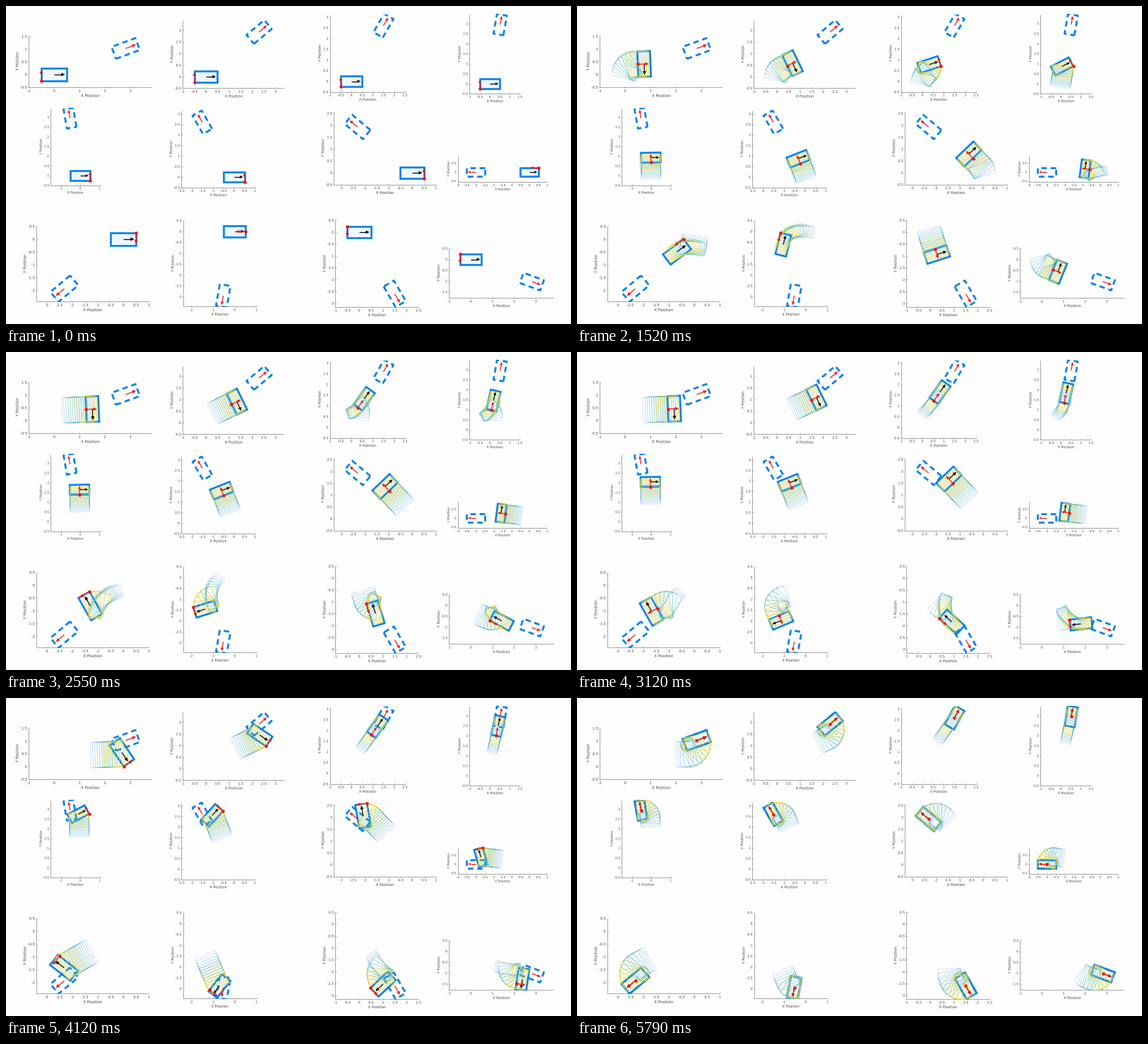
Recreate the animation shown at these times as a matplotlib script. Size 800 by 450 pixels, loop 5850 ms.

```python
import numpy as np
import matplotlib.pyplot as plt
from matplotlib.animation import FuncAnimation
from matplotlib.collections import LineCollection, PolyCollection
from matplotlib.patches import PathPatch, Polygon
from matplotlib.path import Path
from matplotlib.textpath import TextPath
from matplotlib.transforms import Bbox, TransformedBbox

W, H, DPI = 800, 450, 100
PX = 72 / DPI
STEP, FRAMES = 30, 195
LAST = 162                 # frame on which everything has come to rest
GAP, TRAIL = 4, 11         # trail spacing in frames, number of copies
SLIDE = .06                # how far the contact slides per frame
BLUE, FILL, RED, INK = "#0b82e8", "#eff6fc", "#f21414", "#404040"

BOX = np.array([(-.5, -.25), (.5, -.25), (.5, .25), (-.5, .25), (-.5, -.25)])

# face -> push angle in the block frame, depth of the face, half its length
FACES = {"b": (np.pi / 2, .25, .5), "t": (-np.pi / 2, .25, .5),
         "r": (np.pi, .5, .25), "l": (0, .5, .25)}

fig = plt.figure(figsize=(W / DPI, H / DPI), dpi=DPI, facecolor="#fdfdfd")
ax = fig.add_axes([0, 0, 1, 1])
ax.set(xlim=(0, W), ylim=(H, 0))
ax.axis("off")

panels, glyphs, rules = [], [], []


def unit(a):
    return np.array([np.cos(a), np.sin(a)])


def radius(face):
    """Turning radius when the face is pushed at its end."""
    return .2 / FACES[face][2]


def advance(pose, face, turn, dist):
    """Push a face: straight for turn 0, along an arc for turn +1 or -1."""
    x, y, a = pose
    way = a + FACES[face][0]
    if not turn:
        return x + dist * np.cos(way), y + dist * np.sin(way), a
    r = turn * radius(face)
    da = dist / r
    return (x + r * (np.sin(way + da) - np.sin(way)),
            y - r * (np.cos(way + da) - np.cos(way)), a + da)


def approach(pose, goal, face, turn):
    """Arc, straight line and left arc that bring the block to the goal."""
    r, push = radius(face), FACES[face][0]
    way, end = pose[2] + push, goal[2] + push
    d = (goal[:2] + r * unit(end + np.pi / 2)) - (pose[:2] + turn * r * unit(way + np.pi / 2))
    span, line = np.hypot(*d), np.arctan2(d[1], d[0])
    if turn < 0:
        line -= np.arcsin(2 * r / span)
        span = np.sqrt(span ** 2 - 4 * r ** 2)
    first = (turn * (line - way)) % (2 * np.pi)
    last = (end - line) % (2 * np.pi)
    return [(face, turn, r * first), (face, 0, span), (face, 1, r * last)]


def simulate(goal, lead, face, turn, arrive):
    """Pose and contact (face, offset) for every frame."""
    segs, pose = [], (0, 0, 0)
    for f, k, amount in lead:
        segs.append((f, k, np.radians(amount) * radius(f) if k else amount))
        pose = advance(pose, *segs[-1])
    segs += approach(np.array(pose), goal, face, turn)
    total = sum(s[2] for s in segs)

    poses, contacts = [], []
    for i in range(LAST + 1):
        u = i * STEP / 1000 / arrive
        left, pose = total * min(u, 1) ** 1.08, (0, 0, 0)
        for f, k, dist in segs:
            pose = advance(pose, f, k, min(left, dist))
            left -= dist
            if left < 0:
                break
        offset = k * FACES[f][2]
        if contacts and contacts[-1][0] == f:
            old = contacts[-1][1]
            offset = old + np.clip(offset - old, -SLIDE, SLIDE)
        poses.append(pose)
        contacts.append((f if u < 1 else None, offset))
    return np.array(poses), contacts


def text(s, x, y, size, ha="center", upright=False):
    path = TextPath((0, 0), s, size=size)
    v = path.vertices.copy()
    lo, hi = v[:, 0].min(), v[:, 0].max()
    v[:, 0] -= hi if ha == "right" else (lo + hi) / 2
    v[:, 1] -= .36 * size
    if upright:
        v = np.column_stack([-v[:, 1], v[:, 0]])
    glyphs.append(Path(np.column_stack([x + v[:, 0], y - v[:, 1]]), path.codes))


def ticks(lo, hi, step):
    return np.arange(np.ceil(lo / step - 1e-6) * step, hi + .01, step) + 0.0


def trail_style():
    age = np.arange(1, TRAIL + 1) / TRAIL
    stops = [0, .35, .6, .8, 1]
    rgb = [np.interp(age, stops, c) for c in
           ([.97, .88, .40, .33, .40], [.88, .82, .78, .70, .58], [.12, .22, .66, .86, .86])]
    return np.column_stack(rgb + [np.interp(age, [0, .6, 1], [.9, .75, .28])])


class Panel:
    def __init__(self, origin, scale, angle, step, lead=(), face="b", turn=1, arrive=4.8):
        self.origin, self.scale = np.array(origin), scale
        a = np.radians(angle)
        self.goal = np.array([*(3 * unit(a)), a])
        self.poses, self.contacts = simulate(self.goal, lead, face, turn, arrive)

        left, top, right, bottom = self.axes(step)
        clip = TransformedBbox(Bbox([(left - 1, bottom + 1), (right + 1, top - 1)]), ax.transData)
        self.block = Polygon(self.box(self.poses[0]), fc=FILL, ec=BLUE, lw=2.7 * PX,
                             joinstyle="miter", zorder=1)
        goal = ax.plot(*self.box(self.goal).T, color=BLUE, lw=2.8 * PX, zorder=2,
                       dashes=(2.8, 1.9), dash_capstyle="butt")[0]
        self.trail = LineCollection([], colors=trail_style(), linewidths=.85 * PX, zorder=3)
        ax.add_patch(self.block)
        ax.add_collection(self.trail, autolim=False)
        for art in (self.block, goal, self.trail):
            art.set_clip_path(None)
            art.set_clip_box(clip)

    def axes(self, step):
        """Axes that leave a fixed margin around the path of the block's centre."""
        margin = np.array([1, .5])
        lo = self.poses[:, :2].min(0) - margin
        hi = self.poses[:, :2].max(0) + margin
        flip = np.array([self.scale, -self.scale])
        (left, bottom), (right, top) = self.origin + lo * flip, self.origin + hi * flip
        rules.append([(left, top), (left, bottom), (right, bottom)])

        size = 2.3 + .088 * self.scale
        small = .92 * size
        for v in ticks(lo[0], hi[0], step):
            x = self.origin[0] + v * self.scale
            rules.append([(x, bottom), (x, bottom - 1.3)])
            text(f"{v:g}", x, bottom + .9 * size, small)
        for v in ticks(lo[1], hi[1], .5):
            y = self.origin[1] - v * self.scale
            rules.append([(left, y), (left + 1.3, y)])
            text(f"{v:g}", left - 2.5, y, small, "right")
        text("X Position", (left + right) / 2, bottom + 2.15 * size, size)
        text("Y Position", left - 3 * size, (top + bottom) / 2, size, upright=True)
        return left, top, right, bottom

    def place(self, points, pose):
        c, s = unit(pose[2])
        world = np.asarray(points) @ [(c, s), (-s, c)] + pose[:2]
        return self.origin + world * (self.scale, -self.scale)

    def box(self, pose):
        return self.place(BOX, pose)

    def arrow(self, pose, start=(0, 0), angle=0):
        d, n = unit(angle), unit(angle + np.pi / 2)
        tip = start + .42 * d
        neck = tip - .13 * d
        return (self.place([start, neck], pose),
                self.place([tip, neck + .06 * n, neck - .06 * n], pose))

    def contact(self, i):
        """Contact point and push angle; the pusher rests at the centre when done."""
        face, offset = self.contacts[i]
        if face is None:
            return np.zeros(2), None
        push, depth, _ = FACES[face]
        return offset * unit(push - np.pi / 2) - depth * unit(push), push


def add(*args, **kw):
    panels.append(Panel(*args, **kw))


# lead entries: face, turn direction, degrees turned (or distance if straight)
add((68, 97), 36, 20, 1, turn=-1)
add((283, 100), 32.8, 40, .5, turn=-1)
add((489, 106.5), 30.3, 60, .5, [("b", -1, 55), ("b", 1, 93)], "l")
add((685, 110), 28.3, 80, .5, [("b", -1, 10), ("b", 0, .55), ("b", 1, 58)], "l")
add((105, 240), 27.5, 100, 1)
add((322.7, 242), 29.8, 120, .5)
add((575, 236), 33.6, 140, .5, arrive=4.46)
add((741, 235), 25.3, 180, .5, [("r", 1, 25)])
add((166, 330), 36.3, 220, .5, [("t", -1, 10), ("t", 0, .28), ("r", 1, 75)])
add((323.7, 319), 30.8, 260, 1, [("r", 0, .25), ("r", 1, 100)], arrive=4.3)
add((500, 320), 33.6, 300, .5, [("t", 1, 18), ("t", 0, .87), ("t", 1, 70), ("r", 1, 52)])
add((658, 358.5), 30.7, 340, 1, [("t", 1, 68), ("t", 0, .58), ("t", 1, 62), ("r", 1, 50)])

ax.add_collection(LineCollection(rules, colors="#707070", linewidths=.6 * PX, zorder=0), autolim=False)
ax.add_patch(PathPatch(Path.make_compound_path(*glyphs), fc=INK, lw=0, zorder=0))


class Arrows:
    def __init__(self, color, z):
        self.shafts = LineCollection([], colors=color, linewidths=1.2 * PX, zorder=z)
        self.heads = PolyCollection([], facecolors=color, edgecolors=color,
                                    linewidths=.4 * PX, zorder=z)
        ax.add_collection(self.shafts, autolim=False)
        ax.add_collection(self.heads, autolim=False)

    def set(self, arrows):
        self.shafts.set_segments([a[0] for a in arrows])
        self.heads.set_verts([a[1] for a in arrows])


headings, goals, pushes = Arrows("black", 4), Arrows(RED, 5), Arrows(RED, 6)
goals.set([p.arrow(p.goal) for p in panels])
dots = ax.plot([], [], "o", color=RED, ms=4.6 * PX, mew=0, zorder=7)[0]


def draw(i):
    i = min(i, LAST)
    black, red, points = [], [], []
    for p in panels:
        pose = p.poses[i]
        p.block.set_xy(p.box(pose))
        past = [i - GAP * k for k in range(1, TRAIL + 1)]
        p.trail.set_segments([p.box(p.poses[j]) for j in past if j >= 0])
        black.append(p.arrow(pose))
        point, push = p.contact(i)
        points.append(p.place([point], pose)[0])
        if push is not None:
            red.append(p.arrow(pose, point, push))
    headings.set(black)
    pushes.set(red)
    dots.set_data(*np.transpose(points))
    return []


anim = FuncAnimation(fig, draw, frames=FRAMES, init_func=lambda: draw(0),
                     interval=STEP, repeat=True, repeat_delay=0)
plt.show()
```
